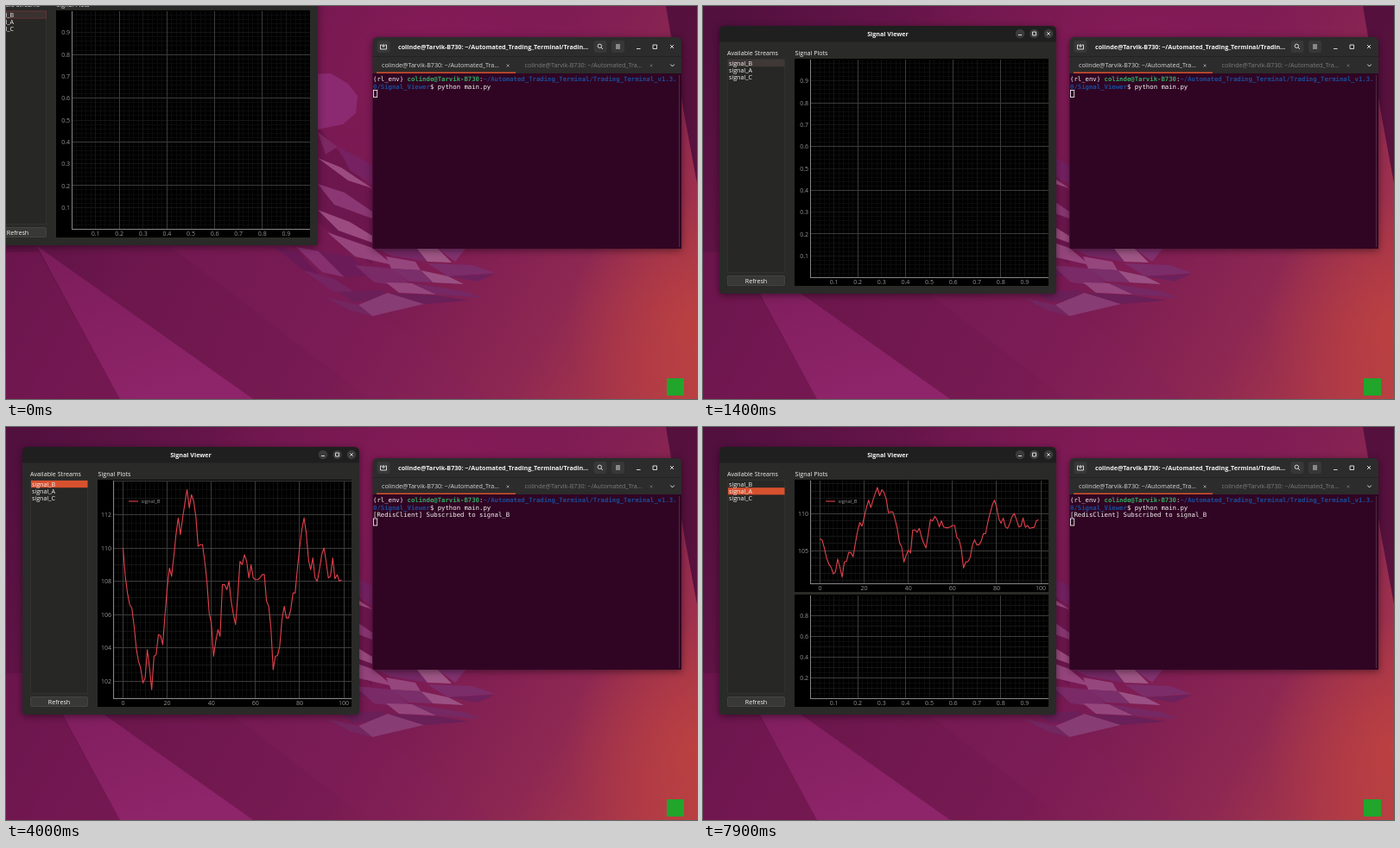
Write an HTML page that moves like this. It is 800 by 455 pixels and loops after 8000 ms.

```html
<!DOCTYPE html>
<html lang="en">
<head>
<meta charset="utf-8">
<title>Signal Viewer</title>
<style>
html, body { margin: 0; width: 100%; height: 100%; overflow: hidden; background: #6d164f; }
svg { display: block; width: 100vw; height: 100vh; }
text { font: 7.15px "Open Sans", "Noto Sans", sans-serif; fill: #f2f2f2; white-space: pre; }
.b { font-weight: 700; }
.mid { text-anchor: middle; }
.end { text-anchor: end; }
.tick { fill: #969696; font-size: 7px; }
.dim { fill: #7d7d7d; }
.mono text { font: 7.3px "DejaVu Sans Mono", "Liberation Mono", monospace; }
.mono .b { font-weight: 700; }
.win { filter: drop-shadow(0 2px 4px rgba(0, 0, 0, .45)); }
.icon { fill: none; stroke: #e8e8e8; stroke-width: .9; }
.grid { fill: none; shape-rendering: crispEdges; }
</style>
</head>
<body>
<svg viewBox="0 0 800 455" preserveAspectRatio="none">
  <defs>
    <linearGradient id="sky" gradientUnits="userSpaceOnUse" x1="0" y1="60" x2="800" y2="520">
      <stop offset="0" stop-color="#52103f"/>
      <stop offset=".25" stop-color="#6b164c"/>
      <stop offset=".55" stop-color="#781a53"/>
      <stop offset=".76" stop-color="#8e2852"/>
      <stop offset=".9" stop-color="#ab3848"/>
      <stop offset="1" stop-color="#bc423e"/>
    </linearGradient>
    <radialGradient id="haze" gradientUnits="userSpaceOnUse" cx="500" cy="60" r="270">
      <stop offset="0" stop-color="#8c1c5a" stop-opacity=".7"/>
      <stop offset="1" stop-color="#8c1c5a" stop-opacity="0"/>
    </radialGradient>
    <radialGradient id="glow" gradientUnits="userSpaceOnUse" cx="800" cy="370" r="150">
      <stop offset="0" stop-color="#c0433f" stop-opacity=".7"/>
      <stop offset="1" stop-color="#c0433f" stop-opacity="0"/>
    </radialGradient>
    <linearGradient id="ray" x1="0" y1="0" x2=".5" y2="1">
      <stop offset="0" stop-color="#7b1c5a"/>
      <stop offset="1" stop-color="#8e2469"/>
    </linearGradient>
  </defs>

  <g id="wallpaper">
    <path fill="url(#sky)" d="M0 0H800V455H0z"/>
    <path fill="url(#haze)" d="M0 0H800V455H0z"/>
    <path fill="url(#glow)" d="M0 0H800V455H0z"/>
    <path fill="#7d1b58" opacity=".4" d="M0 285H38L132 455H0z"/>
    <path fill="url(#ray)" d="M36 278L132 455H286z"/>
    <path fill="#84205c" opacity=".25" d="M190 278H330L560 455H420z"/>
    <path fill="#4d0d3a" opacity=".85" d="M764 0H800V205L786 130z"/>
    <path fill="#611449" opacity=".5" d="M361 140L424 215V300L361 250z"/>
    <g fill="#8b2a70">
      <path d="M350 79L376 78 396 90 407 104 405 124 390 137 361 143 345 120z"/>
      <path d="M361 146L384 163 370 172z" fill="#7d2862"/>
      <path d="M361 176L388 187 424 211 396 202z" fill="#9c4b80"/>
      <path d="M384 163L424 184V207L398 190z" fill="#752162"/>
      <path d="M361 206L392 216 424 238V246L380 230z" fill="#8a3773"/>
      <path d="M361 236L398 250 424 266V274L385 260z" fill="#9c4b80"/>
      <path d="M310 278L338 284 362 310 344 306z" fill="#691a56"/>
      <path d="M336 279L362 284 392 314 366 308z" fill="#863070"/>
      <path d="M362 284L400 290 424 312 392 314z" fill="#6b1c58"/>
      <path d="M344 306L380 316 412 336 378 330z" fill="#752462"/>
      <path d="M372 262L424 280 448 300 404 290z" fill="#95457c"/>
      <path d="M404 300L448 304 472 326 426 320z" fill="#7a2a66"/>
    </g>
    <g fill="#95477d">
      <path d="M428 281L476 281 488 296 446 289z" fill="#752865"/>
      <path d="M440 290L474 296 480 306 446 304z"/>
      <path d="M476 281L500 281 516 297 488 296z" fill="#9f5686"/>
      <path d="M500 281L532 281 520 296z" fill="#813270"/>
      <path d="M488 298L540 300 566 309 512 313z" fill="#7b2d6a"/>
      <path d="M480 306L512 313 530 322 494 320z" fill="#9a5083"/>
      <path d="M512 313L566 310 546 319z" fill="#6d215c"/>
      <path d="M446 304L480 306 494 320 466 319z" fill="#7a2e6a"/>
      <path d="M440 320L470 321 498 334 455 332z"/>
      <path d="M470 321L530 330 551 338 498 334z" fill="#752863"/>
      <path d="M385 331L440 329 430 340 402 343z" fill="#6b1f59"/>
      <path d="M408 346L442 332 484 345 424 359z" fill="#883c74"/>
      <path d="M442 332L498 335 536 341 484 345z" fill="#691f57"/>
      <path d="M372 338L408 346 424 359 398 352z" fill="#722760"/>
    </g>
  </g>
  <rect x="765" y="431" width="20" height="20" fill="#21a52b"/>

  <g class="win">
    <path fill="#2c2c2c" d="M424.500 78V42q0-6 6-6H776q6 0 6 6V78z"/>
    <path fill="#300523" d="M424.500 78H782V281H424.500z"/>
  </g>
  <path d="M424.500 58.500H782" stroke="#232323"/>
  <path d="M429 77.200H590" stroke="#d9512c" stroke-width="1.400"/>
  <path d="M779.500 80V279" stroke="#4a2642" stroke-width="1.200"/>
  <g fill="#383838">
    <rect x="429.500" y="40" width="15" height="14" rx="3"/>
    <rect x="680.500" y="40" width="15" height="14" rx="3"/>
    <rect x="701" y="40" width="15" height="14" rx="3"/>
  </g>
  <g class="icon">
    <path d="M435 45H433.500V50H440.500V45H439M437 44V48M435 46H439"/>
    <circle cx="687.300" cy="46.300" r="2.200"/>
    <path d="M689 48L691 50M706 45H711M706 47H711M706 49H711M730 49.500H734.500M749 45H753.500V49.500H749zM769 45L773 49M773 45L769 49M769.300 67.500L771.500 70 773.700 67.500"/>
    <path stroke="#9a9a9a" d="M579.500 67.500L582.500 70.500M582.500 67.500L579.500 70.500"/>
    <path stroke="#666" d="M745.500 67.500L748.500 70.500M748.500 67.500L745.500 70.500"/>
  </g>
  <text class="b" x="454" y="49.700">colinde@Tarvik-B730: ~/Automated_Trading_Terminal/Tradin…</text>
  <text x="435" y="71.300" style="fill:#d6d6d6">colinde@Tarvik-B730: ~/Automated_Tra…</text>
  <text class="dim" x="600.500" y="71.300">colinde@Tarvik-B730: ~/Automated_Tra…</text>
  <g class="mono">
    <text x="425" y="87">(rl_env) <tspan class="b" fill="#2fae62">colinde@Tarvik-B730</tspan>:<tspan class="b" fill="#1b4c98">~/Automated_Trading_Terminal/Trading_Terminal_v1.3.</tspan></text>
    <text x="425" y="95.500"><tspan class="b" fill="#1b4c98">0/Signal_Viewer</tspan>$ python main.py</text>
    <text id="reply" x="425" y="104">[RedisClient] Subscribed to signal_B</text>
  </g>
  <rect id="cursor" class="icon" x="425.500" width="4.200" height="8"/>

  <g id="viewer">
    <g class="win">
      <path fill="#2a2a28" d="M0 18H390V306q0 4-4 4H4q-4 0-4-4z"/>
      <path fill="#1f1f1f" d="M0 18.500V6q0-6 6-6H384q6 0 6 6V18.500z"/>
    </g>
    <text class="b mid" x="195" y="12">Signal Viewer</text>
    <g fill="#3b3b3b"><circle cx="348" cy="9" r="5.300"/><circle cx="364.500" cy="9" r="5.300"/><circle cx="381" cy="9" r="5.300"/></g>
    <path class="icon" d="M346 10.500H350M362.500 7H366.500V11H362.500zM379.300 7.300L382.700 10.700M382.700 7.300L379.300 10.700"/>
    <text x="9" y="34">Available Streams</text>
    <text x="87.500" y="34">Signal Plots</text>
    <rect x="9.500" y="38.500" width="66" height="247" fill="#272725" stroke="#313130"/>
    <rect id="row" x="10" width="65.500" height="8.200" stroke-width=".8"/>
    <text x="11" y="45.500">signal_B</text>
    <text x="11" y="54">signal_A</text>
    <text x="11" y="62.300">signal_C</text>
    <rect x="9.500" y="289.500" width="66" height="11" rx="1" fill="#383836" stroke="#434341"/>
    <text class="mid" x="42.500" y="297.700">Refresh</text>
    <g id="plots"></g>
  </g>
</svg>
<script>
const $ = id => document.getElementById(id);
const LOOP = 8000, LEFT = 105, RIGHT = 381;
const UNIT = [0, 1], SAMPLES = [-4.5, 103.5];

// Tenths above 100, one sample per second enters on the right.
const samples = [
  118, 100, 83, 73, 66, 64, 53, 40, 32, 28, 19, 22, 39, 28, 15, 35, 36, 48, 47.5, 42,
  60, 76, 88, 83, 95, 108, 118, 108, 118, 127, 135, 124, 132, 128, 119, 101, 102, 102, 92, 80,
  61, 55, 35, 44, 51, 47, 78, 78, 75, 80, 68, 60, 54, 72, 92, 90, 96, 92, 82, 90,
  82, 81, 81, 82, 84, 84, 68, 65, 52, 27, 35, 35.5, 41, 57, 65, 58, 58, 63, 73, 73,
  88, 100, 111, 118, 109, 93, 87, 94, 82, 80, 87, 96, 100, 92, 82, 83, 94, 81.5, 84, 80,
  81, 81.5, 90, 92
];

const scale = ([a, b], from, to) => v => from + (v - a) / (b - a) * (to - from);

function steps([a, b], step) {
  const out = [];
  for (let i = Math.ceil(a / step + .01); i * step < b - step * .01; i++) out.push(i * step);
  return out;
}

function makePlot({ top, bottom, xr, yr, xGrid, yGrid, xLabel, yLabel, live }) {
  const sx = scale(xr, LEFT, RIGHT), sy = scale(yr, bottom, top);
  const label = v => +v.toFixed(1);
  const shades = ['#0c0c0c', '#161616', '#3c3c3c'];
  let s = `<path fill="#000" d="M87 ${top - .5}H381V${bottom + 9.5}H87z"/>`;
  shades.forEach((shade, i) => {
    const d = steps(xr, xGrid[i]).map(v => `M${sx(v)} ${top}V${bottom}`).join('')
            + steps(yr, yGrid[i]).map(v => `M${LEFT} ${sy(v)}H${RIGHT}`).join('');
    s += `<path class="grid" stroke="${shade}" d="${d}"/>`;
  });
  s += `<path class="grid" stroke="#858585" d="M${LEFT}.500 ${top}V${bottom}H${RIGHT}"/>`;
  for (const v of steps(xr, xLabel)) s += `<text class="tick mid" x="${sx(v)}" y="${bottom + 7.5}">${label(v)}</text>`;
  for (const v of steps(yr, yLabel).filter(v => sy(v) > top + 4)) {
    s += `<text class="tick end" x="103" y="${sy(v) + 2.6}">${label(v)}</text>`;
  }
  if (live) s += `<path d="M123 63H134" stroke="#e2404c" stroke-width="1.100"/>
    <text class="tick" style="font-size:5.800px" x="137.500" y="65">signal_B</text>
    <path class="line" fill="none" stroke="#e2404c" stroke-width="1.100" stroke-linejoin="round"/>`;
  const g = document.createElementNS('http://www.w3.org/2000/svg', 'g');
  g.innerHTML = s;
  $('plots').append(g);
  const line = g.querySelector('.line');
  return {
    show(on) { g.style.display = on ? '' : 'none'; },
    draw(shift) {
      const pts = samples.slice(shift, shift + 100);
      line.setAttribute('d', 'M' + pts.map((v, i) => `${sx(i).toFixed(1)} ${sy(100 + v / 10).toFixed(1)}`).join('L'));
    }
  };
}

const empty = { xr: UNIT, yr: UNIT, xGrid: [.02, .1, .2], yGrid: [.02, .1, .2], xLabel: .1, yLabel: .1 };
const live = { xr: SAMPLES, xGrid: [2, 10, 20], xLabel: 20, live: true };
const blank = makePlot({ ...empty, top: 38.5, bottom: 291.5 });
const full = makePlot({ ...live, top: 38.5, bottom: 291.5, yr: [100.96, 114.07], yGrid: [.5, 1, 2], yLabel: 2 });
const upper = makePlot({ ...live, top: 38.5, bottom: 158.5, yr: [100.58, 114.48], yGrid: [1, 1, 5], yLabel: 5 });
const lower = makePlot({ ...empty, top: 171.5, bottom: 291.5, yGrid: [.05, .1, .2], yLabel: .2 });

function setAttrs(el, attrs) {
  for (const k in attrs) el.setAttribute(k, attrs[k]);
}

// Dragged in along a diagonal, then nudged into place.
function windowPos(t) {
  const k = Math.floor(t / 100);
  const p = Math.min(1, k / 5), e = p * p * (3 - 2 * p);
  const q = Math.min(1, Math.max(0, (k - 5) / 4));
  return [Math.round(-29 + 50 * e - 2 * q), Math.round(-33 + 53 * e + 3 * q)];
}

function rowStyle(t) {
  if (t < 1000) return { fill: '#3a3230', stroke: '#6b3434' };
  if (t < 2200) return { fill: '#3f3836', stroke: 'none' };
  return { fill: '#d8512f', stroke: 'none' };
}

function render(t) {
  const subscribed = t >= 2800, split = t >= 6600;
  $('viewer').setAttribute('transform', `translate(${windowPos(t)})`);
  setAttrs($('row'), { ...rowStyle(t), y: t < 7900 ? 39 : 47.2 });
  $('reply').style.display = subscribed ? '' : 'none';
  $('cursor').setAttribute('y', subscribed ? 106 : 97.5);
  blank.show(!subscribed);
  full.show(subscribed && !split);
  upper.show(split);
  lower.show(split);
  if (subscribed) (split ? upper : full).draw(Math.max(0, Math.floor(t / 1000) - 3));
}

const start = performance.now();
function tick() {
  render((performance.now() - start) % LOOP);
  requestAnimationFrame(tick);
}
tick();
</script>
</body>
</html>
```
